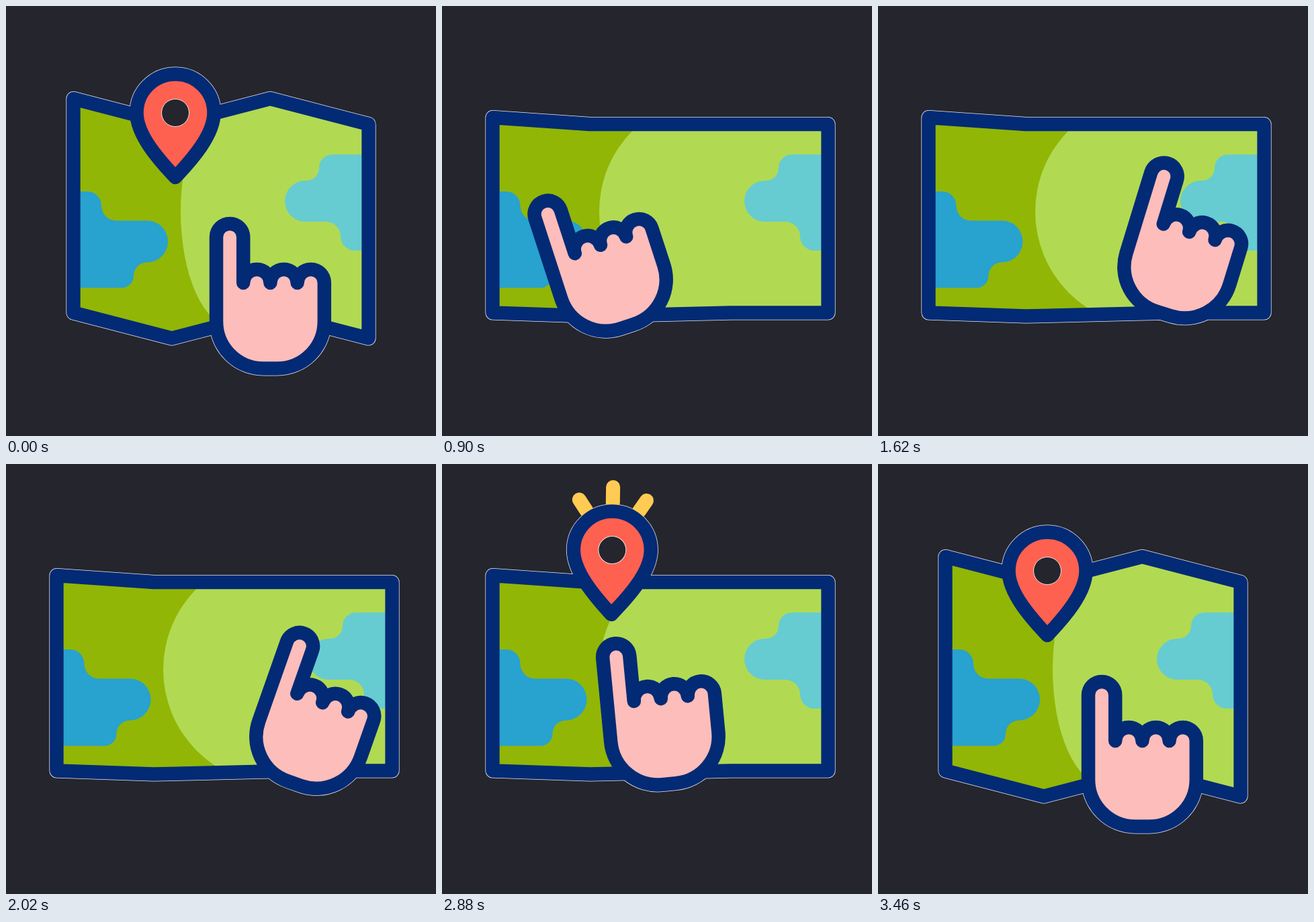
Recreate the animation shown at these times as an HTML page. Size 640x640 px, loop 3.58 s.

```html
<!DOCTYPE html>
<html lang="en">
<head>
<meta charset="utf-8">
<title>Map search</title>
<style>
  html, body { margin: 0; width: 100%; height: 100%; overflow: hidden; background: #25252e; }
  svg { display: block; width: 100vw; height: 100vh; }
  .line { stroke: #032a75; stroke-width: 20.5; stroke-linejoin: round; }
  .halo { fill: none; stroke: #fff; stroke-width: 22; stroke-linejoin: round; opacity: .9; }
  .rays { stroke: #ffcb52; stroke-width: 21; stroke-linecap: round; }
</style>
</head>
<body>
<svg viewBox="0 0 640 640">
  <defs>
    <path id="handShape"/>
    <path id="pinShape" d="M0-153.5a57.5 57.5 0 0 1 57.5 57.5c0 33-33 70-57.5 96c-24.5-26-57.5-63-57.5-96a57.5 57.5 0 0 1 57.5-57.5z"/>
    <clipPath id="land"><path class="ground"/></clipPath>
  </defs>

  <path class="halo frame"/>
  <path class="halo ground" style="stroke-width:1"/>
  <use class="halo pin" href="#pinShape"/>
  <use class="halo hand" href="#handShape"/>

  <g clip-path="url(#land)">
    <rect width="640" height="640" fill="#b1da52"/>
    <path id="dark" fill="#91b606"/>
  </g>
  <path id="lake" fill="#28a2ce" d="M100 276H121a21 21 0 0 1 21 21a22 22 0 0 0 22 22.5H210a31 31 0 0 1 0 62a20 20 0 0 0-20 20a18 18 0 0 1-18 18H100z"/>
  <path id="sea" fill="#66ccd1" d="M540 221H486a20 20 0 0 0-20 20a19 19 0 0 1-19 19H445.5a30.5 30.5 0 0 0 0 61H476a22 22 0 0 1 22 22a21 21 0 0 0 21 21H540z"/>
  <path class="line frame" fill="none"/>

  <g class="pin">
    <g class="rays">
      <line class="ray"/><line class="ray"/><line class="ray"/>
    </g>
    <use class="line" href="#pinShape" fill="#ff6150"/>
    <circle cy="-96" r="20.5" fill="#25252e" stroke="#fff" stroke-opacity=".85"/>
  </g>
  <use class="line hand" href="#handShape" fill="#fdbdba"/>
</svg>
<script>
const LOOP = 3580;
const all = s => [...document.querySelectorAll(s)];
const set = (s, name, value) => all(s).forEach(el => el.setAttribute(name, value));
const mix = (a, b, k) => a + (b - a) * k;

// Eased 0 to 1 between two times.
function ramp(t, from, to) {
  const u = Math.min(1, Math.max(0, (t - from) / (to - from)));
  return (1 - Math.cos(Math.PI * u)) / 2;
}

// Zigzag map: high folds sink and low folds rise as it spreads out.
function outline(open) {
  const top = [], bottom = [];
  for (let i = 0; i < 4; i++) {
    const low = i % 2, shift = open * (28 + 5 * Math.min(i, 2));
    const half = i % 3 ? mix(73.2, 105, open) : mix(219.6, 249.6, open);
    const x = mix(320, 325, open) + (i < 2 ? -half : half);
    const y = 138 + 38 * low;
    top.push([x, y + (low ? 0 : shift)]);
    bottom.unshift([x, y + 318.5 - (low ? shift : 0)]);
  }
  return 'M' + top.concat(bottom).join('L') + 'Z';
}

const finger = 'a20.1 20.1 0 0 1 40.2 0';
set('#handShape', 'd', `M-80 9.5V-116${finger}V-48${finger.repeat(3)}V9.5a70 70 0 0 1-70 70h-20.8a70 70 0 0 1-70-70z`);

// Stops of the hand: left, top, right, tap, home.
const home = { x: 393, y: 460, turn: 0 };
const tap = { x: 330, y: 397, turn: -5.5 };
const legs = [
  { from: 300, to: 750, x: 219, y: 412, turn: -23 },
  { from: 750, to: 1300, x: 399, y: 352, turn: 5.4 },
  { from: 1300, to: 1860, x: 480, y: 401, turn: 24.4 },
  { from: 1860, to: 2460, ...tap },
  { from: 2940, to: 3460, ...home }
];

function drawMap(t) {
  const close = ramp(t, 2930, 3440);
  const open = ramp(t, 200, 512) - close;
  const spread = ramp(t, 200, 720) - close;
  set('.frame', 'd', outline(open));
  set('.ground', 'd', outline(spread));
  set('#lake', 'transform', `translate(${-25.5 * open})`);
  set('#sea', 'transform', `translate(${35 * open})`);

  const rx = mix(77, 171, spread), cx = mix(260, 234, spread) + rx;
  set('#dark', 'd', `M0 0H${cx}V135A${rx} 171 0 0 0 ${cx} 477V640H0Z`);
}

function drawHand(t) {
  const { x, y, turn } = legs.reduce((p, leg) => {
    const k = ramp(t, leg.from, leg.to);
    return { x: mix(p.x, leg.x, k), y: mix(p.y, leg.y, k), turn: mix(p.turn, leg.turn, k) };
  }, home);
  set('.hand', 'transform', `translate(${x} ${y}) rotate(${turn})`);
}

function drawPin(t) {
  const swell = ramp(t, 200, 400), shrink = ramp(t, 400, 660), pop = ramp(t, 2680, 2870);
  const scale = 1 + .1 * swell - 1.1 * shrink + pop;
  const turn = 5.2 * (shrink - swell) + .8 * (pop - ramp(t, 2870, 3090));
  const lift = 31 * (pop - ramp(t, 3090, 3460));
  set('.pin', 'transform', `translate(252 ${255 - lift}) rotate(${turn}) scale(${scale})`);

  const reach = 40 + 67 * (ramp(t, 2740, 2940) - ramp(t, 3080, 3400));
  all('.ray').forEach((ray, i) => {
    const side = i - 1, length = reach - 4 * Math.abs(side);
    ray.setAttribute('transform', `translate(0 -96) rotate(${34 * side})`);
    ray.setAttribute('y1', -Math.min(length, 70));
    ray.setAttribute('y2', -length);
  });
}

const start = performance.now();
function tick() {
  const t = (performance.now() - start) % LOOP;
  drawMap(t);
  drawHand(t);
  drawPin(t);
  requestAnimationFrame(tick);
}
tick();
</script>
</body>
</html>
```
